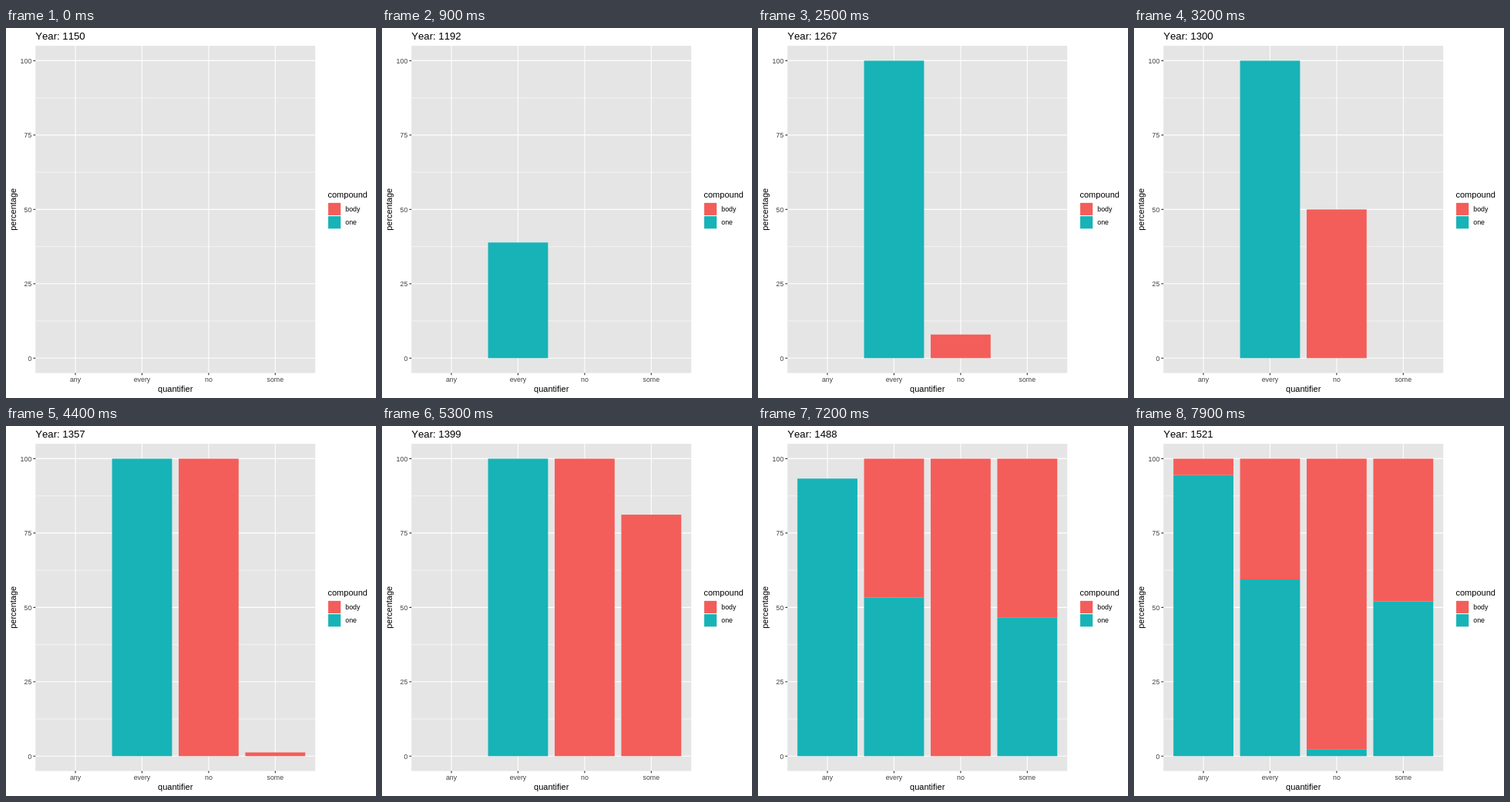
These frames come from a looping animation (480 px wide and 480 px high, 8 s). An HTML page:

```html
<!DOCTYPE html>
<html lang="en">
<head>
<meta charset="utf-8">
<title>Quantifier compounds</title>
<style>
  html, body { margin: 0; width: 100%; height: 100%; overflow: hidden; background: #fff; }
  svg { display: block; width: 480px; height: 480px; }
  text { font: 11px "Liberation Sans", Arial, sans-serif; font-kerning: none; }
  .label { font-size: 8.8px; fill: #404040; }
  .key { font-size: 8.8px; }
  .title { font-size: 13.2px; }
  .mid { text-anchor: middle; }
  .end { text-anchor: end; }
</style>
</head>
<body>
<svg id="chart" viewBox="0 0 480 480"></svg>
<script>
const chart = document.getElementById("chart");
const RED = "#f35e5a", TEAL = "#17b3b7";
const LEFT = 38.2, RIGHT = 401.2, TOP = 23.1, BOTTOM = 447.6;
const UNIT = (RIGHT - LEFT) / 4.2;
const STEP_MS = 100, STEPS = 80;

const xAt = i => LEFT + (0.6 + i) * UNIT;
const yAt = pct => BOTTOM - (pct + 5) / 110 * (BOTTOM - TOP);

function add(tag, attrs, content = "") {
  const el = document.createElementNS("http://www.w3.org/2000/svg", tag);
  for (const name in attrs) el.setAttribute(name, attrs[name]);
  el.textContent = content;
  return chart.appendChild(el);
}
const rect = (x, y, width, height, fill, extra) =>
  add("rect", { x, y, width, height, fill, ...extra });
const line = (x1, y1, x2, y2, stroke, width = 1.07) =>
  add("line", { x1, y1, x2, y2, stroke, "stroke-width": width });
const text = (x, y, content, cls = "", extra) =>
  add("text", { x, y, class: cls, ...extra }, content);

// Panel, grid and axes
const names = ["any", "every", "no", "some"];
rect(LEFT, TOP, RIGHT - LEFT, BOTTOM - TOP, "#e5e5e5");
for (let p = 12.5; p < 100; p += 25) line(LEFT, yAt(p), RIGHT, yAt(p), "#fff", 0.53);
for (let p = 0; p <= 100; p += 25) {
  line(LEFT, yAt(p), RIGHT, yAt(p), "#fff");
  line(LEFT - 2.75, yAt(p), LEFT, yAt(p), "#272727");
  text(33.3, yAt(p) + 3.2, p, "label end");
}
names.forEach((name, i) => {
  line(xAt(i), TOP, xAt(i), BOTTOM, "#fff");
  line(xAt(i), BOTTOM, xAt(i), BOTTOM + 2.75, "#272727");
  text(xAt(i), 459, name, "label mid");
});
text(219.7, 472, "quantifier", "mid");
text(0, 0, "percentage", "mid", { transform: "translate(13.3 235.3) rotate(-90)" });

// Legend
text(417.5, 220, "compound");
[["body", RED], ["one", TEAL]].forEach(([name, color], i) => {
  const y = 226.3 + i * 17.28;
  rect(417.5, y, 17.28, 17.28, color, { stroke: "#fff", "stroke-width": 1.07 });
  text(440.3, y + 11.8, name, "key");
});

const title = text(38.2, 15, "", "title");
const bars = names.map((_, i) => {
  const bar = color => rect(xAt(i) - 0.45 * UNIT, 0, 0.9 * UNIT, 0, color);
  return { one: bar(TEAL), body: bar(RED) };
});

// Each key: step, then percentages in the order of the names
const keys = [
  { at: 0,  one: [0, 0, 0, 0],          body: [0, 0, 0, 0] },
  { at: 21, one: [0, 100, 0, 0],        body: [0, 0, 0, 0] },
  { at: 43, one: [0, 100, 0, 0],        body: [0, 0, 100, 0] },
  { at: 57, one: [0, 100, 0, 0],        body: [0, 0, 100, 100] },
  { at: 75, one: [100, 50, 0, 50],      body: [0, 50, 100, 50] },
  { at: 89, one: [70.8, 100, 11.7, 60.6], body: [29.2, 0, 88.3, 39.4] }
];

function place(bar, from, to) {
  bar.setAttribute("y", yAt(to));
  bar.setAttribute("height", Math.max(0, yAt(from) - yAt(to)));
}

function draw(now) {
  const step = Math.floor(now / STEP_MS) % STEPS;
  const next = keys.findIndex(k => k.at > step);
  const a = keys[next - 1], b = keys[next];
  const ease = (1 - Math.cos(Math.PI * (step - a.at) / (b.at - a.at))) / 2;
  const mix = (part, i) => a[part][i] + (b[part][i] - a[part][i]) * ease;

  title.textContent = "Year: " + Math.round(1150 + step * 465 / 99);
  bars.forEach((bar, i) => {
    const one = mix("one", i);
    place(bar.one, 0, one);
    place(bar.body, one, one + mix("body", i));
  });
}

const start = performance.now();
function tick() {
  draw(performance.now() - start);
  requestAnimationFrame(tick);
}
tick();
</script>
</body>
</html>
```
